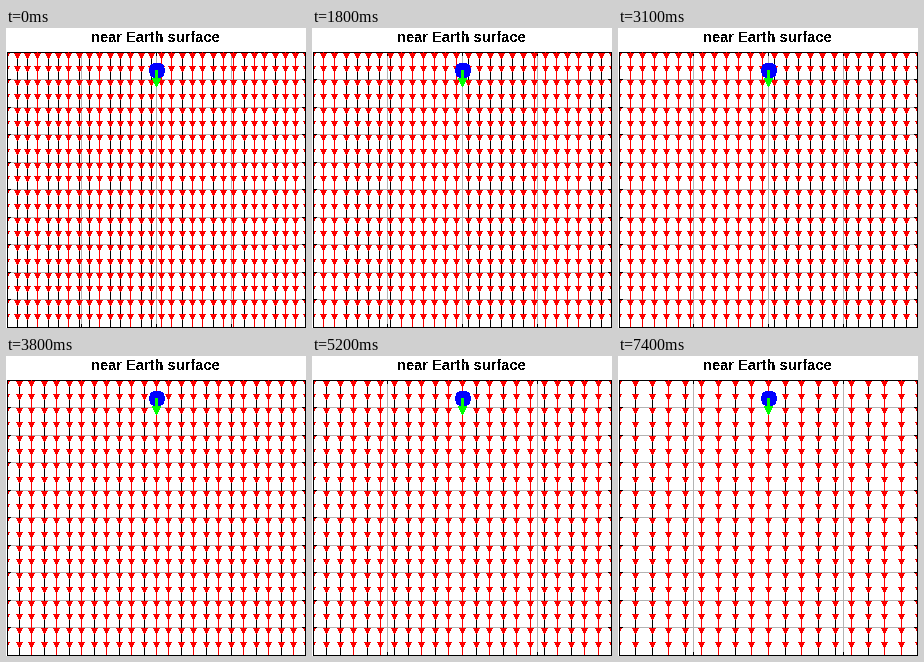
A matplotlib script for the animation above (8 s loop, 300x300 px).

```python
import numpy as np
import matplotlib.pyplot as plt
from matplotlib.animation import FuncAnimation
from matplotlib.collections import LineCollection, PolyCollection
from matplotlib.patches import Circle, Polygon, Rectangle

SIZE, DPI, STEP = 300, 100, 100
PX = 72 / DPI
LEFT, TOP, RIGHT, BOTTOM = 1, 24, 299, 299
RED, GREEN, BLUE, GRID = "#ff0000", "#00ff00", "#0000ff", "#b4b4b4"

# Start of each field in ms; every new field has one column fewer.
STARTS = [0, 1000, 1800, 2500, 3100, 3800, 4300, 5200, 6000, 6500, 7000, 7400]
LOOP = 8000
MOST_GAPS = 29
ROWS = 20
ROW_STEP = (BOTTOM - TOP) / ROWS

fig = plt.figure(figsize=(SIZE / DPI, SIZE / DPI), dpi=DPI, facecolor="white")
ax = fig.add_axes([0, 0, 1, 1])
ax.set_xlim(0, SIZE)
ax.set_ylim(SIZE, 0)
ax.axis("off")

inside = Rectangle((LEFT + 1, TOP), RIGHT - LEFT - 1, BOTTOM - TOP,
                   transform=ax.transData)


def segments(lines, color, z):
    """One pixel wide lines; whole coordinates snap to that pixel."""
    lc = LineCollection(lines, colors=color, linewidths=PX, antialiaseds=False,
                        capstyle="butt", zorder=z)
    ax.add_collection(lc, autolim=False)
    return lc


def head(x, tip, half=2.7, tall=6):
    return [(x - half, tip - tall), (x + half, tip - tall), (x, tip)]


def field(gaps):
    """Columns of falling arrows, evenly spread over the plot."""
    xs = 0.8 + 299.4 / gaps * np.arange(gaps + 1)
    cols = np.floor(xs)
    tips = np.floor(TOP + 7 + ROW_STEP * np.arange(ROWS + 1))
    colors = [RED if x % 1 >= 0.5 else "black" for x in xs]
    shafts = segments([[(x, TOP), (x, BOTTOM)] for x in cols], colors, 3)
    heads = PolyCollection([head(x + 0.5, t) for x in cols for t in tips],
                           facecolors=RED, edgecolors="none",
                           antialiaseds=False, zorder=4)
    ax.add_collection(heads, autolim=False)
    for part in (shafts, heads):
        part.set_clip_path(inside)
    return shafts, heads


# Grid, ticks and frame
grid_x = [75, 150, 225]
grid_y = [np.floor(TOP + 2 * ROW_STEP * i) for i in range(1, ROWS // 2)]
segments([[(x, TOP), (x, BOTTOM)] for x in grid_x]
         + [[(LEFT, y), (RIGHT, y)] for y in grid_y], GRID, 1)
ticks = [[(x, a), (x, a + 3)] for x in grid_x for a in (TOP, BOTTOM - 3)]
ticks += [[(a, y), (a + 3, y)] for y in grid_y for a in (LEFT, RIGHT - 3)]
segments(ticks, "black", 2)
segments([[(LEFT, y), (RIGHT, y)] for y in (TOP, BOTTOM)]
         + [[(x, TOP), (x, BOTTOM)] for x in (LEFT, RIGHT)], "black", 2)

# Falling body with its force arrow
ax.add_patch(Circle((151, 42.5), 7.5, fc=BLUE, ec="none", aa=False, zorder=7))
ax.add_patch(Rectangle((149, 42), 3, 9, fc=GREEN, ec="none", aa=False, zorder=8))
ax.add_patch(Polygon(head(150.5, 59, 4.5, 9), fc=GREEN, ec="none", aa=False,
                     zorder=8))

ax.text(149.5, 14, "near Earth surface", ha="center", va="baseline",
        family="Liberation Sans", weight="bold", fontsize=14.6 * PX,
        antialiased=False)

fields = [field(MOST_GAPS - i) for i in range(len(STARTS))]


def draw(i):
    now = np.searchsorted(STARTS, i * STEP, side="right") - 1
    for k, parts in enumerate(fields):
        for part in parts:
            part.set_visible(k == now)
    return [part for parts in fields for part in parts]


draw(0)
anim = FuncAnimation(fig, draw, frames=LOOP // STEP, interval=STEP,
                     repeat=True, repeat_delay=0, blit=False)
plt.show()
```
